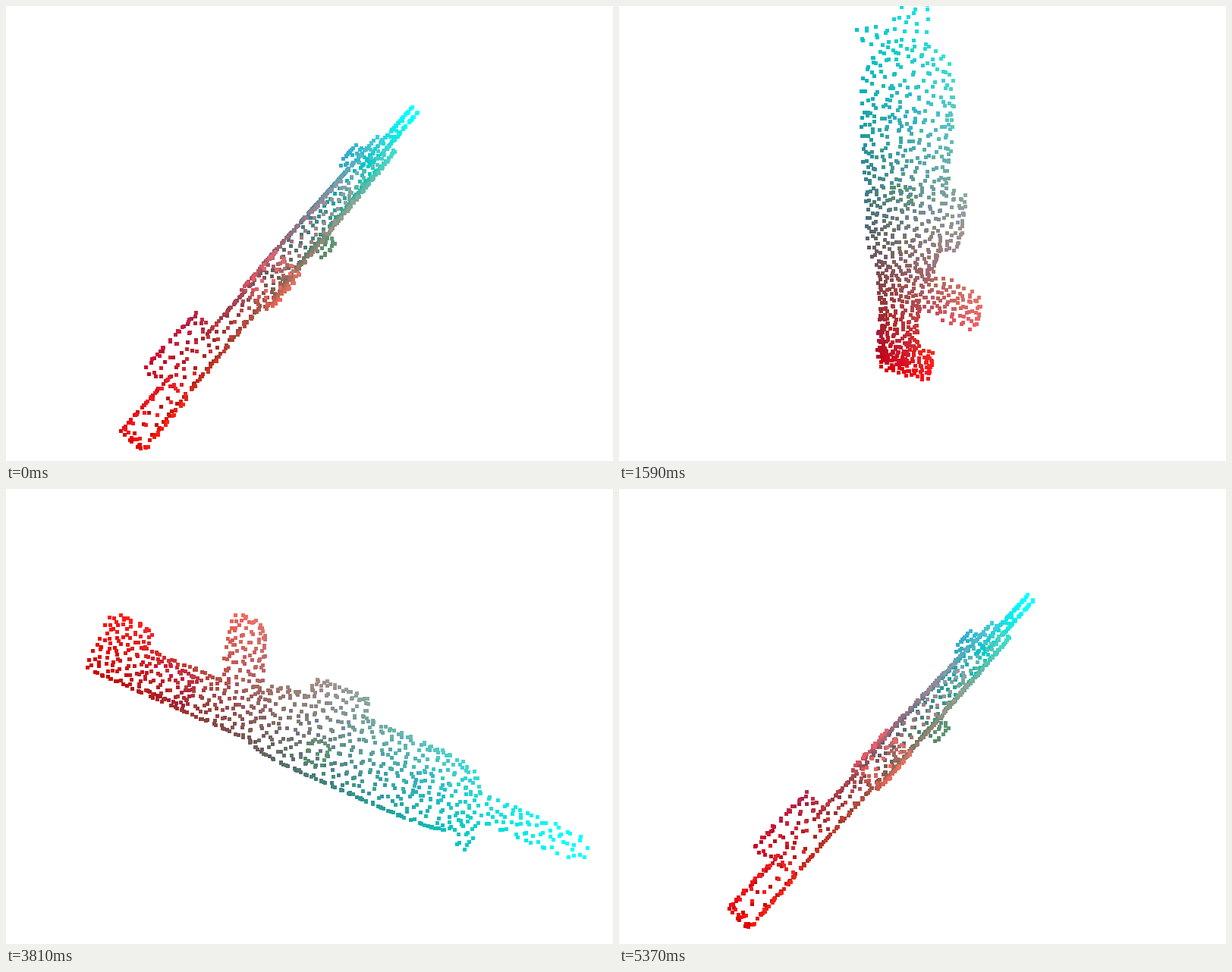
Write a matplotlib script that moves like this. It is 800 by 600 pixels and loops after 5400 ms.

```python
import numpy as np
import matplotlib.pyplot as plt
from matplotlib.animation import FuncAnimation

W, H = 800, 600
FRAMES, INTERVAL = 180, 30
FOCAL, DIST = 592, 1.53
COUNT = 1024
rng = np.random.default_rng(7)


class Part:
    """Rounded slab; axes are length s, width w and height h."""

    def __init__(self, s, w, h, power=8, lean=0):
        lo, hi = np.array([s, w, h]).T
        self.mid, self.half = (lo + hi) / 2, (hi - lo) / 2
        self.power, self.lean = power, lean

    def radius(self, q):
        return (np.abs(q) ** self.power).sum(1) ** (1 / self.power)

    def place(self, q, w):
        p = self.mid + self.half * np.column_stack([q[:, 0], w, q[:, 1]])
        p[:, 0] += self.lean * (p[:, 2] - self.mid[2])
        return p

    def surface(self):
        n = int(400 + 60000 * self.half[0] * self.half[2])
        face = rng.uniform(-1, 1, (n, 2))
        face = face[self.radius(face) < 1]
        rim = rng.uniform(-1, 1, (n // 2, 2))
        rim /= np.abs(rim).max(1, keepdims=True)
        rim /= self.radius(rim)[:, None]
        return np.vstack([
            self.place(face, rng.choice([-1, 1], len(face))),
            self.place(rim, rng.uniform(-1, 1, len(rim))),
        ])

    def contains(self, p):
        d = p - self.mid
        s = d[:, 0] - self.lean * d[:, 2]
        q = np.column_stack([s, d[:, 2]]) / self.half[[0, 2]]
        return (self.radius(q) < .97) & (np.abs(d[:, 1]) < .97 * self.half[1])


def flat(s, h, width, **kw):
    return Part(s, (-width, width), h, **kw)


PARTS = [
    flat((-.79, -.65), (-.155, .065), .035, power=9),                # stock
    flat((-.70, -.10), (-.155, -.005), .034, power=12),              # neck
    flat((-.35, -.22), (-.06, .235), .045, power=3.5, lean=-.3),     # magazine
    flat((-.03, .17), (-.06, .13), .042),                            # block
    flat((-.18, .59), (-.185, .065), .048, power=5),                 # body
    flat((.50, .97), (-.095, -.01), .018, power=5),                  # barrel
    flat((.60, .64), (-.20, -.09), .012),                            # sight
    Part((-.64, -.45), (.03, .10), (-.14, -.02)),                    # bolt
    Part((.42, .52), (.045, .09), (-.09, -.01)),                     # scope
    Part((.05, .11), (-.10, -.045), (-.14, -.07)),                   # tab
]


def hull(parts):
    """Surface points of all parts that no other part covers."""
    shells = []
    for part in parts:
        p = part.surface()
        for other in parts:
            if other is not part:
                p = p[~other.contains(p)]
        shells.append(p)
    return np.vstack(shells)


def spread(p, n):
    """Farthest point sampling."""
    picked = [0]
    gap = np.full(len(p), np.inf)
    for _ in range(n - 1):
        gap = np.minimum(gap, ((p - p[picked[-1]]) ** 2).sum(1))
        picked.append(int(gap.argmax()))
    return p[picked]


def unit(v):
    v = np.array(v, float)
    return v / np.linalg.norm(v)


cloud = spread(hull(PARTS), COUNT)

# Colour follows position along three tilted axes
s, w, h = cloud.T
colors = np.clip(np.column_stack([
    .51 - .577 * s + .95 * h,
    .50 + .577 * s - .707 * w + .408 * h,
    .495 + .577 * s + .707 * w + .408 * h,
]), 0, 1)

# Start pose in view axes: right, up, towards the viewer
s0 = unit((.531, .617, -.582))
h0 = np.array((.397, .407, .822))
h0 = unit(h0 - s0 * (s0 @ h0))
start = cloud @ np.array([s0, np.cross(h0, s0), h0])
axis = unit((.835, .474, .276))


def pose(a):
    p = (start * np.cos(a) + np.cross(axis, start) * np.sin(a)
         + np.outer(start @ axis, axis) * (1 - np.cos(a)))
    roll = .1 * np.cos((a - 5.06) / 2) ** 16
    c, r = np.cos(roll), np.sin(roll)
    x, y, z = p.T
    return np.column_stack([c * x - r * y, r * x + c * y, z])


fig = plt.figure(figsize=(W / 100, H / 100), dpi=100, facecolor="white")
ax = fig.add_axes([0, 0, 1, 1])
ax.set(xlim=(0, W), ylim=(H, 0))
ax.axis("off")
dots = ax.scatter(np.zeros(COUNT), np.zeros(COUNT), s=(5 * .72) ** 2,
                  marker="s", c=colors, linewidths=0, antialiased=False)


def update(i):
    p = pose(2 * np.pi * i / FRAMES)
    order = p[:, 2].argsort()
    x, y, z = p[order].T
    k = FOCAL / (DIST - z)
    dots.set_offsets(np.column_stack([W / 2 + k * x, H / 2 - k * y]))
    dots.set_facecolors(colors[order])
    return dots,


anim = FuncAnimation(fig, update, frames=FRAMES, interval=INTERVAL,
                     repeat=True, repeat_delay=0, init_func=lambda: update(0))
plt.show()
```
